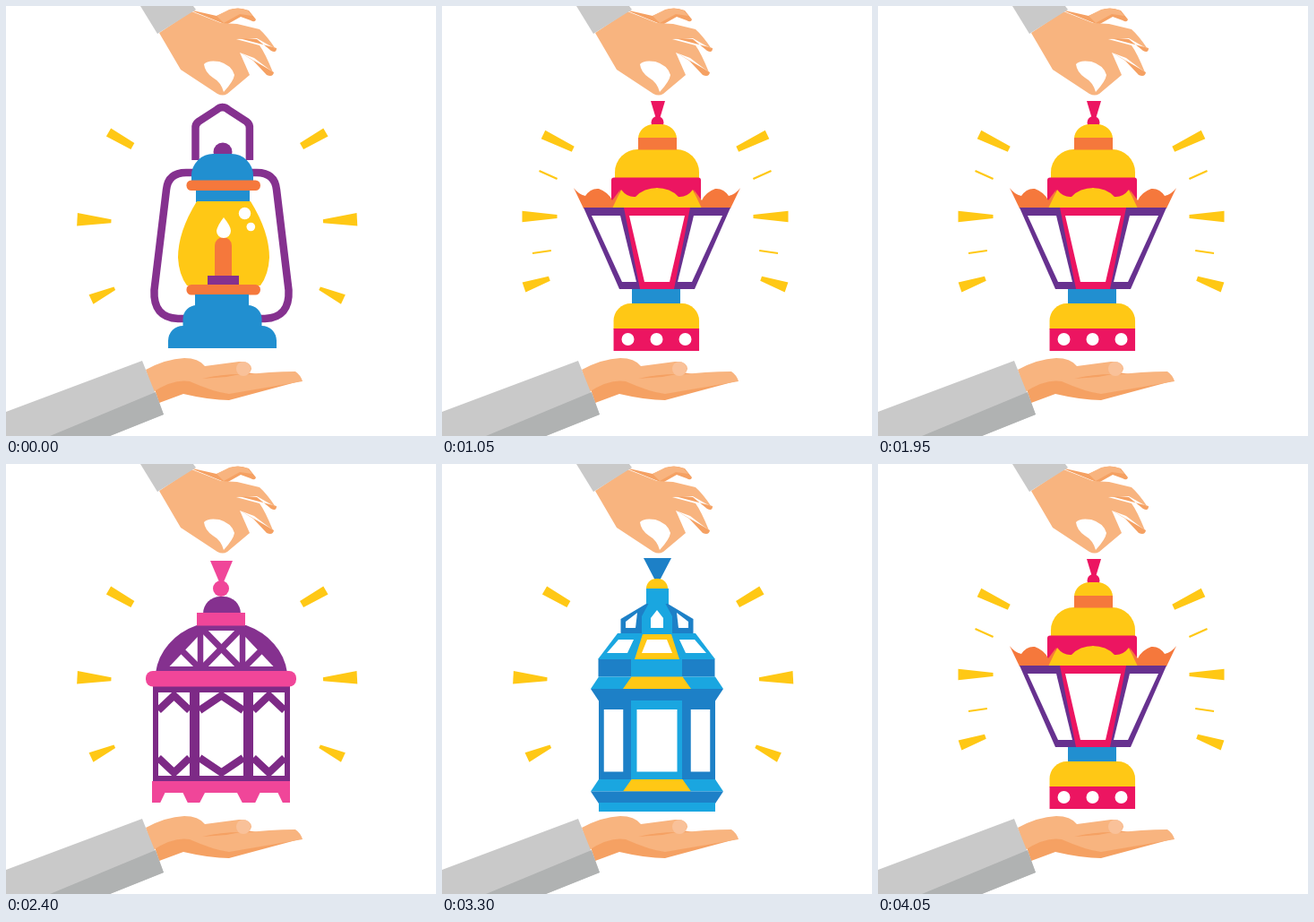
Animation, 480 px wide and 480 px high, one loop 4200 ms. Source, as an HTML page:

```html
<!DOCTYPE html>
<html lang="en">
<head>
<meta charset="utf-8">
<title>Lanterns between hands</title>
<style>
  html, body { margin: 0; width: 100%; height: 100%; overflow: hidden; background: #fff; }
  svg { display: block; width: 100vw; height: 100vh; }
</style>
</head>
<body>
<svg id="stage" viewBox="0 0 480 480"></svg>
<script>
const WHITE = '#fff', YELLOW = '#ffc815', ORANGE = '#f5783c', BLUE = '#218fd0', PURPLE = '#85318f',
  PLUM = '#7d2a86', VIOLET = '#67318f', PINK = '#f04699', ROSE = '#ec1561', GREEN = '#b2d23c',
  NAVY = '#2e338e', DEEP = '#1d80c7', SKY = '#1aa6e0', SKIN = '#f8b47f', SHADE = '#f5a163',
  CLOTH = '#c9c9c9', FOLD = '#b0b2b2';

const path = (fill, d) => `<path fill="${fill}" d="${d}"/>`;
const line = (color, width, d) => `<path fill="none" stroke="${color}" stroke-width="${width}" d="${d}"/>`;
const circle = (fill, x, y, r) => `<circle fill="${fill}" cx="${x}" cy="${y}" r="${r}"/>`;
// The shapes below are centred on x.
const bar = (fill, x, top, bottom, w, r = 0) =>
  `<rect fill="${fill}" x="${x - w / 2}" y="${top}" width="${w}" height="${bottom - top}" rx="${r}"/>`;
const trap = (fill, x, top, bottom, w1, w2) =>
  path(fill, `M${x - w1 / 2} ${top}h${w1}L${x + w2 / 2} ${bottom}h${-w2}Z`);
// A block with rounded shoulders and a flat top.
const cap = (fill, x, top, bottom, w, flat) => {
  const rx = (w - flat) / 2, ry = Math.min(rx, bottom - top);
  return path(fill, `M${x - w / 2} ${bottom}V${top + ry}a${rx} ${ry} 0 0 1 ${rx} ${-ry}` +
    `h${flat}a${rx} ${ry} 0 0 1 ${rx} ${ry}V${bottom}Z`);
};
const mirror = (axis, part) => part + `<g transform="translate(${2 * axis}) scale(-1 1)">${part}</g>`;
const each = (list, make) => list.map(make).join('');

const hands =
  // upper hand
  path(SHADE, 'M204 4L235 11L249 5Q258 0 271 5L279 15Q278 19 273 16L262 12L246 21Z') +
  path(SKIN, 'M235 11L249 4Q259 1 270 5L275 11L261 9L243 19Z') +
  path(SHADE, 'M256 35L280 37L296 50Q302 53 302 47ZM258 50L276 61L291 77Q298 80 299 74Z') +
  path(SKIN, 'M171 30L207 6L240 19L258 20L283 26Q291 33 301 48L280 36L257 37L283 44' +
    'Q289 52 298 74L277 58L261 52L272 77L247 98Q242 101 236 98L195 71Z') +
  path(WHITE, 'M221 65Q225 60 238 62Q252 66 255 77Q254 84 243 96Q240 85 231 80Q222 74 221 65Z') +
  path(CLOTH, 'M150 0H209L212 4L169 31Z') +
  // lower hand
  path(SHADE, 'M160 410L205 400L331 418L249 440Q228 440 198 433L171 443Z') +
  path(SKIN, 'M156 406Q178 394 199 393Q215 393 222 402L260 397Q273 396 274 405Q273 411 264 412' +
    'Q294 408 323 408Q329 412 331 419L249 433Q232 431 205 419Q187 416 164 431Z') +
  path(SHADE, 'M219 416Q240 411 262 411L246 414Z') +
  circle('#f9c199', 265, 405, 8) +
  path(CLOTH, 'M0 453L152 396L176 456L116 480H0Z') +
  path(FOLD, 'M49 480L167 431L176 456L116 480Z');

// A tapered stroke starting at its outer end.
const ray = (x, y, angle, length, w1, w2) => `<g transform="translate(${x} ${y}) rotate(${angle})">` +
  path(YELLOW, `M0 ${-w1 / 2}V${w1 / 2}L${length} ${w2 / 2}V${-w2 / 2}Z`) + '</g>';
const rays = [
  mirror(235.7, ray(114.5, 141, 30, 31, 10.5, 8) + ray(79.5, 238.3, 3, 38, 14.5, 4) +
    ray(95, 327.5, -25, 29, 11.5, 4)),
  mirror(238, ray(113, 143.5, 26, 37, 10.5, 6.5) + ray(89.5, 235, 0, 39, 12.5, 4) +
    ray(91.5, 314, -19, 30, 11.5, 5.5) + ray(108.5, 184, 24, 22, 2.2, 2.2) + ray(101, 276, -8, 21, 2, 2))
];

const oilLamp =
  mirror(241.7, line(PURPLE, 8.5, 'M211.5 172V137Q211 132 215 129L235 116Q238 113 242 113')) +
  circle(PURPLE, 242, 163, 10.5) +
  mirror(240.5, line(PURPLE, 8.5, 'M212 186H201Q181 186 179 205L165.5 317Q164 348 192 349H210')) +
  cap(BLUE, 241.5, 165, 195, 69, 20) + bar(BLUE, 242, 204, 219, 60) +
  mirror(243, path(YELLOW, 'M244 218H213Q192 252 192 281Q193 300 202 312H244Z')) +
  each([194.5, 311], y => bar(ORANGE, 242.7, y, y + 11.5, 82.5, 5.5)) +
  circle(WHITE, 266.5, 231.5, 6.7) + circle(WHITE, 273.3, 246.5, 4.8) +
  cap(ORANGE, 242.5, 258, 302, 19, 0) + bar(PURPLE, 242.5, 301, 311, 35) +
  path(WHITE, 'M243 236Q251 246 251 251A8 8 0 0 1 235 251Q236 245 243 236Z') +
  bar(BLUE, 241, 322, 336, 60) + cap(BLUE, 241.5, 334, 358, 88, 57) + cap(BLUE, 241.5, 357, 382, 121, 88);

// Bracing in one column of the cage, the same at top and bottom.
const brace = (left, right) => each([y => y, y => 603 - y], at =>
  line(PLUM, 8.5, `M${left} ${at(275)}L${(left + right) / 2} ${at(258.5)}L${right} ${at(275)}`));
const domeLantern =
  trap(PINK, 240.5, 108, 134, 25, 3) + circle(PINK, 240, 139, 9) +
  cap(PURPLE, 241, 148, 167, 42, 4) +
  path(PURPLE, 'M167 233A74 65 0 0 1 213 180H268A74 65 0 0 1 314 233Z') +
  trap(WHITE, 240.5, 186, 226, 40, 116) +
  mirror(240.5, line(PURPLE, 6.5, 'M217 182V230') + line(PURPLE, 7, 'M217 182L264 230M190 202L216 228')) +
  bar(PINK, 240, 166, 180.5, 54) +
  bar(PLUM, 240.5, 247, 355, 153) + bar(WHITE, 240.5, 255, 348, 141) +
  brace(170, 205) + brace(216, 265) + brace(276, 311) +
  each([210.5, 270.5], x => bar(PLUM, x, 248, 354, 11)) +
  bar(PINK, 240, 231, 248.5, 168, 8) + bar(PINK, 240, 354, 378, 154) +
  each([187.5, 240, 293.5], x => trap(WHITE, x, 367, 378.5, x === 240 ? 36 : 20, x === 240 ? 48 : 31));

const crownLantern =
  trap(ROSE, 241, 106, 126, 16, 4) + circle(ROSE, 240.5, 130, 7) +
  cap(YELLOW, 240.5, 132, 148, 43, 8) + cap(YELLOW, 240, 160, 193, 94, 43) +
  bar(ORANGE, 240.5, 147, 160.5, 43) + bar(ROSE, 239, 191.5, 223, 100, 3) +
  mirror(240, path(ORANGE, 'M147 203Q152 210 160 212Q166 203 175 204Q186 208 190 217L199 205L194 226H158Z')) +
  mirror(240, path(YELLOW, 'M190 226L200 205Q207 214 216 213Q225 203 241 203V226Z')) +
  mirror(240, path(VIOLET, 'M158 225H205L222 316H198Z') + path(WHITE, 'M167 234H199L217 308H201Z')) +
  trap(ROSE, 240, 225, 316, 74, 38) + trap(WHITE, 240, 234, 308, 62, 28) +
  bar(BLUE, 239, 316, 333, 54) + cap(YELLOW, 239.3, 332, 361, 95.5, 57) + bar(ROSE, 239.3, 360, 385, 95.5) +
  each([-1, 0, 1], i => circle(WHITE, 239.5 + 32 * i, 372, 7));

const greenLantern =
  trap(NAVY, 240, 109, 129, 20, 4) + circle(NAVY, 239, 133, 7) +
  cap(GREEN, 239.5, 137, 157, 59, 7) + bar(ROSE, 239.5, 156, 166.5, 59) +
  cap(GREEN, 240, 166, 191, 106, 62) + bar(BLUE, 240, 190, 220, 106) +
  mirror(240.3, path(YELLOW, 'M158 198L187 213Q194 199 203 198Q216 199 228 213L241 197V228H174Z')) +
  trap(ROSE, 240, 228, 324, 134, 54) + trap(WHITE, 240, 234, 318, 116, 47) + bar(ROSE, 241, 230, 320, 6.5) +
  trap(GREEN, 241, 324, 359, 55, 113) + trap(WHITE, 241, 331, 352, 53, 88) + bar(GREEN, 241, 328, 356, 6.5) +
  bar(BLUE, 241.5, 359, 386, 113) + bar(WHITE, 241.5, 366, 379, 99) + bar(BLUE, 241, 364, 382, 6.5);

const flare = y => trap(SKY, 240, y, y + 13.5, 130, 148) + trap(YELLOW, 240, y, y + 13.5, 57, 76) +
  trap(DEEP, 240, y + 13.5, y + 27, 148, 130);
const blueLantern =
  trap(DEEP, 240.5, 105, 129, 31, 6) + cap(YELLOW, 240, 128, 139, 24, 2) + bar(SKY, 240.5, 139, 157, 25) +
  trap(DEEP, 240, 156, 173, 24, 81) + bar(DEEP, 240, 173, 190, 81) +
  trap(SKY, 240, 156, 170, 19, 34) + bar(SKY, 240, 170, 190, 34) +
  path(WHITE, 'M240 163L247 172V183H233V172Z') +
  mirror(240, path(WHITE, 'M205 176L218 166L216 183H205Z')) +
  trap(SKY, 239.5, 189, 218, 87, 131) +
  mirror(239.5, path(WHITE, 'M184 211L197 196H214L207 211Z')) +
  trap(YELLOW, 240, 190, 218, 32, 50) + trap(WHITE, 240, 196, 211, 22, 34) +
  bar(DEEP, 239.5, 218, 237.5, 130) + bar(SKY, 239.5, 218, 237.5, 57) +
  flare(237.5) +
  bar(DEEP, 240, 264, 353, 130) + bar(SKY, 239.5, 264, 353, 57) + bar(WHITE, 240, 274, 343.5, 45) +
  mirror(240, bar(WHITE, 191.5, 274, 343.5, 21.5)) +
  flare(352) + bar(SKY, 240, 378, 388, 130);

const order = [oilLamp, domeLantern, greenLantern, crownLantern, blueLantern, greenLantern, crownLantern];
const STEP = 150, LOOP = 4200;
const stage = document.getElementById('stage');
const start = performance.now();
let shown = -1;

function draw(now) {
  const step = Math.floor(Math.max(0, now - start) % LOOP / STEP);
  if (step !== shown) {
    shown = step;
    // Rays alternate on every step, lanterns on every second one.
    stage.innerHTML = hands + rays[step % 2] + order[(step >> 1) % order.length];
  }
  requestAnimationFrame(draw);
}
draw(start);
</script>
</body>
</html>
```
